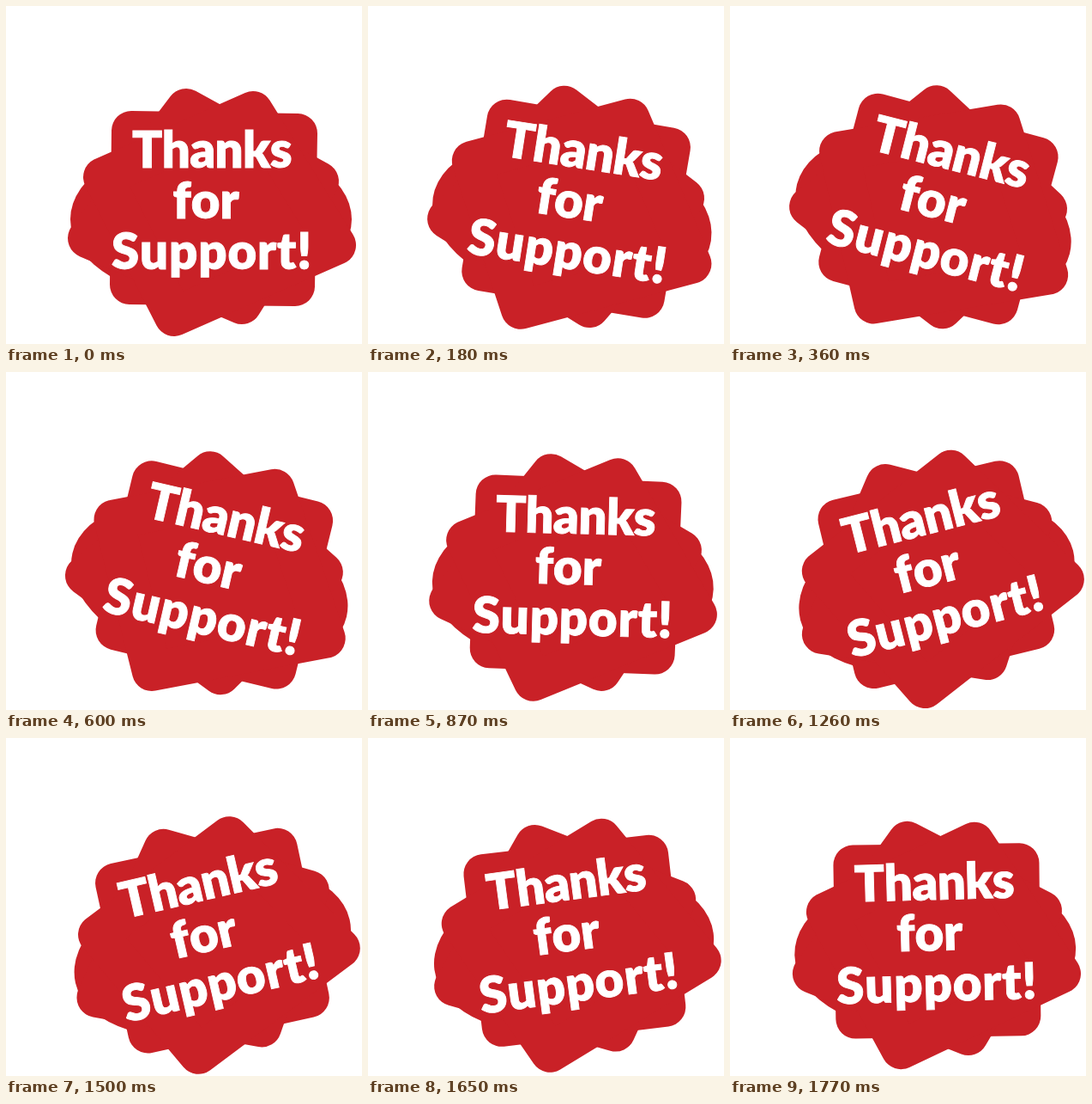
Recreate the animation shown at these times as an HTML page. Size 415 px wide and 393 px high, loop 1800 ms.

```html
<!DOCTYPE html>
<html lang="en">
<head>
<meta charset="utf-8">
<title>Thanks for Support!</title>
<style>
  html, body { margin: 0; width: 100%; height: 100%; overflow: hidden; background: #fff; }
  svg { display: block; width: 415px; height: 393px; }
  .seal { fill: #c92127; }
  /* The thick round stroke gives each slab its soft corners */
  .seal polygon { stroke: #c92127; stroke-width: 46; stroke-linejoin: round; }
  text {
    font: 900 58px Lato, "Open Sans", sans-serif;
    font-kerning: none;
    text-anchor: middle;
    fill: #fff;
    stroke: #fff;
    stroke-width: 0.9;
  }
</style>
</head>
<body>
<svg viewBox="0 0 415 393">
  <g id="badge">
    <g class="seal">
      <ellipse cx="239" cy="248" rx="164" ry="95"/>
      <polygon points="146,145 340,148 337,326 144,324"/>
      <polygon points="210,119 365,204 275,347 95,270"/>
      <polygon points="288,122 385,278 196,361 113,199"/>
    </g>
    <text x="240" y="188" letter-spacing="-0.6">Thanks</text>
    <text x="233" y="247">for</text>
    <text x="240" y="306" letter-spacing="0.9">Support!</text>
  </g>
</svg>
<script>
  const LOOP = 1800, STEP = 30, SWING = 15, CENTER = 240;
  const badge = document.getElementById("badge");
  const start = performance.now();

  function draw() {
    const elapsed = Math.max(0, performance.now() - start) % LOOP;
    const time = Math.floor(elapsed / STEP) * STEP;
    const angle = SWING * Math.sin(2 * Math.PI * time / LOOP);
    badge.setAttribute("transform", `rotate(${angle} ${CENTER} ${CENTER})`);
    requestAnimationFrame(draw);
  }
  draw();
</script>
</body>
</html>
```
